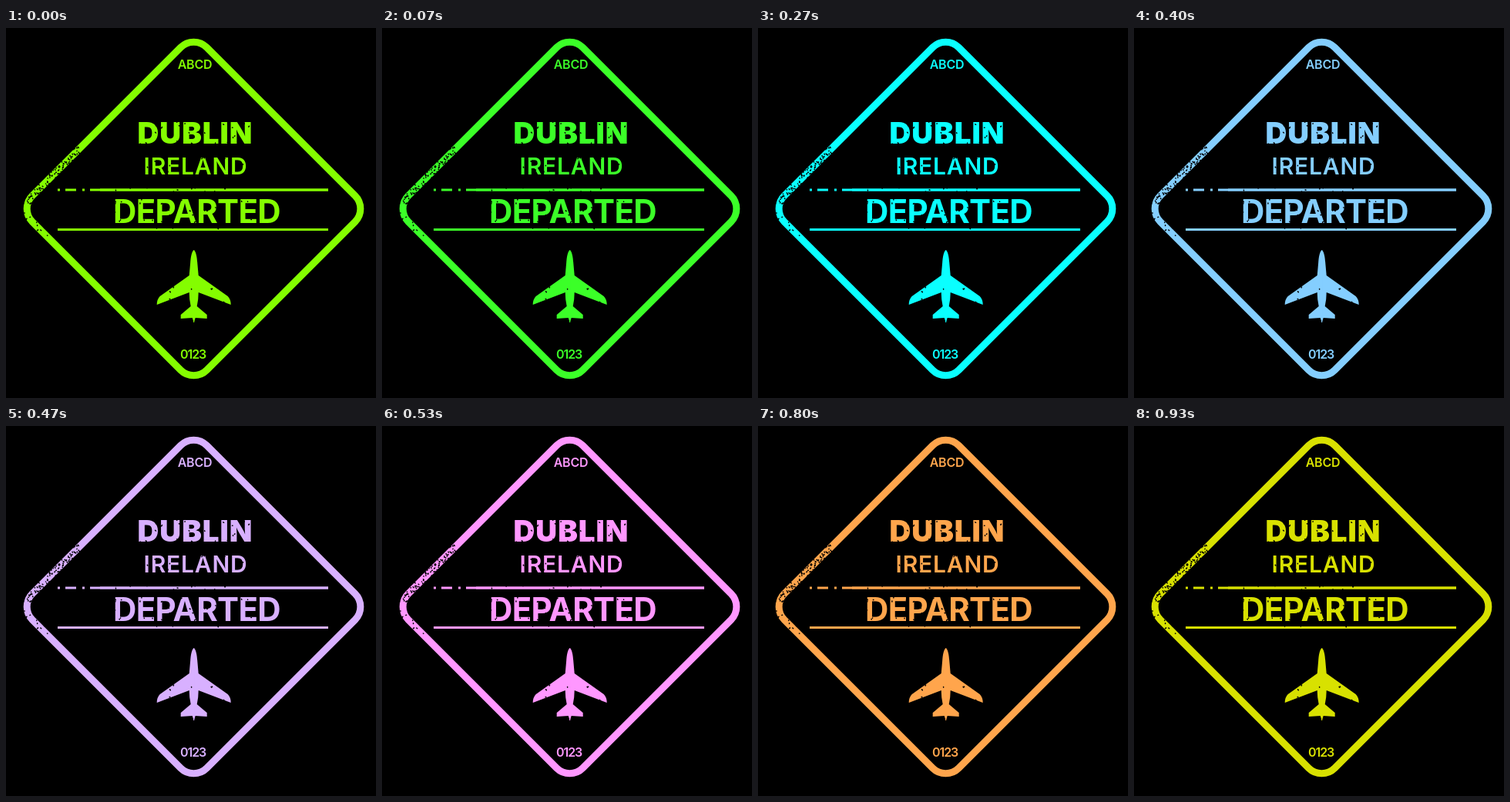
An HTML page for the animation above (990 ms loop, 480 px wide and 480 px high).

```html
<!DOCTYPE html>
<html lang="en">
<head>
<meta charset="utf-8">
<style>
  html, body { margin: 0; width: 100%; height: 100%; overflow: hidden; background: #000; }
  svg { display: block; width: 480px; height: 480px; }
  text { font-family: Inter, "Open Sans", sans-serif; font-weight: 600; text-anchor: middle; }
</style>
</head>
<body>
<svg id="stamp" viewBox="0 0 480 480" fill="currentColor">
  <rect x="-160" y="-160" width="320" height="320" rx="24" transform="translate(243.5 234.5) rotate(45)"
    fill="none" stroke="currentColor" stroke-width="9"/>
  <text x="245" y="53" font-size="16" letter-spacing="-.2">ABCD</text>
  <text x="245.5" y="150" font-size="38.5" style="font-weight: 900" letter-spacing="1">DUBLIN</text>
  <text x="246" y="190" font-size="30" letter-spacing=".8">IRELAND</text>
  <text x="247.5" y="252.5" font-size="42" style="font-weight: 700" letter-spacing="-.7">DEPARTED</text>
  <text x="242.6" y="429" font-size="16" letter-spacing="-1.1">0123</text>
  <g stroke="currentColor">
    <path d="M122 210H418" stroke-width="3.6"/>
    <path d="M67 210H122" stroke-width="3" stroke-dasharray="3 7 14 8"/>
    <path d="M67 261.5H418" stroke-width="3"/>
  </g>
  <g transform="translate(243.7 288)">
    <path id="half" d="M-.5 0C3 1 4 10 4.5 16L6 33L44 60Q48 64 48 71L6 55Q6 64 4 73L17 84V89L2 88L0 94H-.5Z"/>
    <use href="#half" transform="scale(-1 1)"/>
  </g>
  <path id="wear" fill="none" stroke="#000" stroke-width="1.5" stroke-linecap="round"/>
</svg>
<script>
  const stamp = document.getElementById('stamp');

  let seed = 7;
  const random = () => (seed = seed * 16807 % 2147483647) / 2147483647;
  const jitter = spread => (random() - .5) * spread;
  const speck = (x, y) => `M${x.toFixed(1)} ${y.toFixed(1)}l${jitter(2).toFixed(1)} ${jitter(2).toFixed(1)}`;

  // Worn ink: dense at the left corner and the edge above it, sparse over the lettering and plane.
  let specks = '';
  for (let i = 0; i < 110; i++) {
    const along = 8 + 70 * random() ** 1.3;
    const side = random() < .85 || along > 40 ? -1 : 1;
    specks += speck(17.5 + along + jitter(9), 234.5 + side * along + jitter(9));
  }
  for (let i = 0; i < 170; i++) specks += speck(140 + 190 * random() ** 1.6, 122 + 140 * random());
  for (let i = 0; i < 12; i++) specks += speck(244 + jitter(80), 345 + jitter(30));
  document.getElementById('wear').setAttribute('d', specks);

  const LOOP = 990, STEPS = 15, STEP_TIME = 1000 / STEPS;
  // Each channel is a clipped cosine wave with its lowest point at step `low`.
  const wave = (step, mid, swing, low) =>
    Math.round(Math.min(255, Math.max(0, mid - swing * Math.cos((step - low) * 2 * Math.PI / STEPS))));

  function draw(now) {
    // Changes fall on whole hundredths of a second.
    const time = Math.floor(now % LOOP / 10) * 10;
    const step = Math.floor((time + 3.4) / STEP_TIME);
    const red = wave(step, 195, 203, 3);
    const green = wave(step, 208, 75, 9.7);
    const blue = wave(step, 212, 232, -.75);
    stamp.style.color = `rgb(${red}, ${green}, ${blue})`;
  }

  const start = performance.now();
  function tick() {
    draw(performance.now() - start);
    requestAnimationFrame(tick);
  }
  tick();
</script>
</body>
</html>
```
